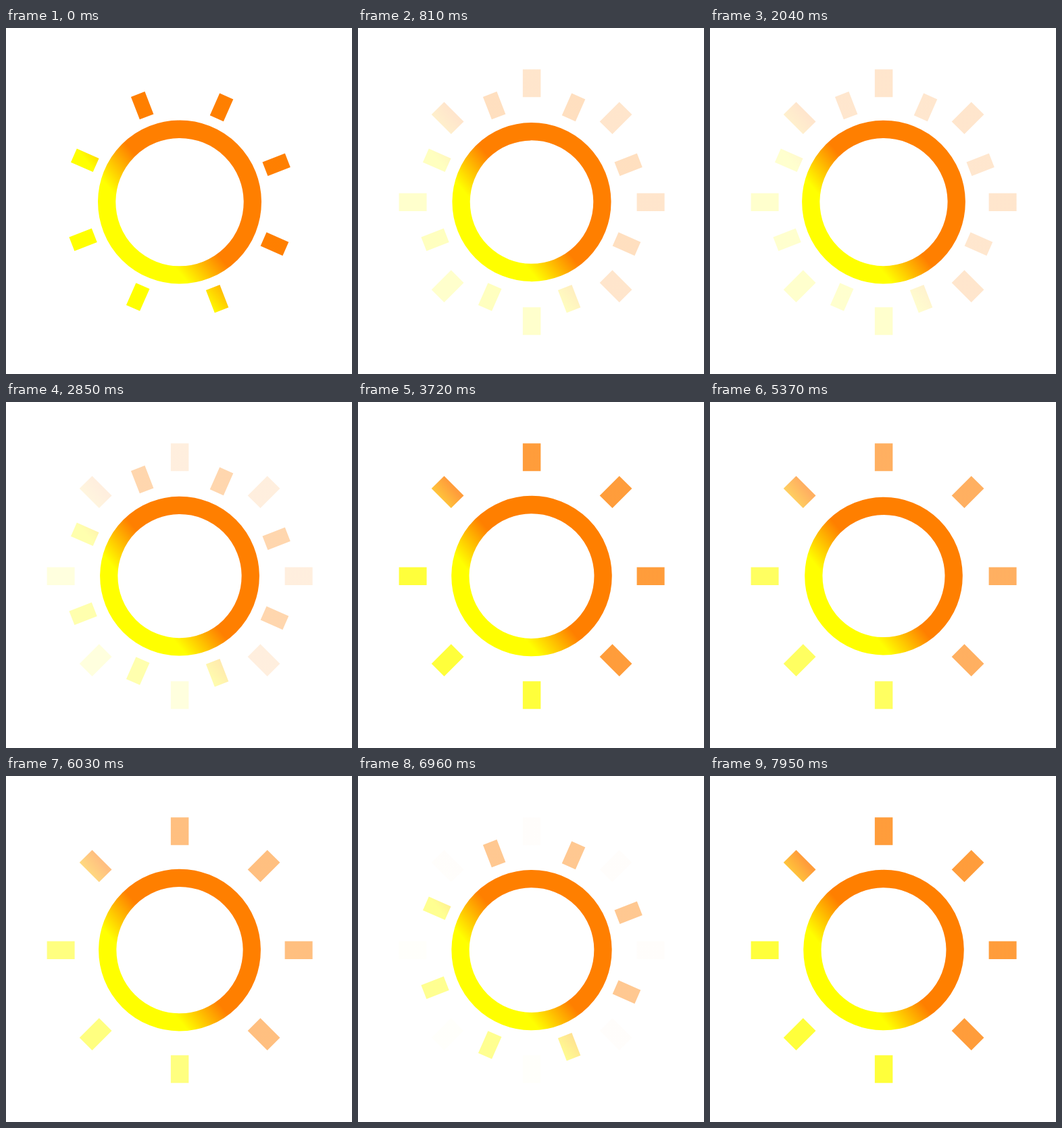
Recreate the animation shown at these times as an HTML page. Size 512x512 px, loop 8 s.

```html
<!DOCTYPE html>
<html lang="en">
<head>
<meta charset="utf-8">
<title>Sun</title>
<style>
  html, body { margin: 0; width: 100%; height: 100%; overflow: hidden; background: #fff; }
  svg { display: block; width: 100%; height: 100%; }
</style>
</head>
<body>
<svg viewBox="0 0 512 512">
  <defs>
    <linearGradient id="glow" gradientUnits="userSpaceOnUse" x1="-26.2" y1="21.8" x2="20.8" y2="-17.3">
      <stop offset="0" stop-color="#ff0"/>
      <stop offset="1" stop-color="#ff7f00"/>
    </linearGradient>
  </defs>
  <path id="near" fill="url(#glow)"/>
  <path id="far" fill="url(#glow)"/>
  <circle id="ring" cx="257" cy="257.6" r="108" fill="none" stroke="url(#glow)" stroke-width="26.3"/>
</svg>
<script>
const LOOP = 8000, PULSE = 2115;
const CENTER = { x: 257.1, y: 257.7 };
const [near, far, ring] = ['near', 'far', 'ring'].map(id => document.getElementById(id));

// [time in ms, opacity]
const NEAR_FADE = [[0, 1], [390, .64], [810, .25], [1080, 0], [1960, 0], [2040, .18], [PULSE, 1]];
const FAR_FADE = [[0, 0], [600, 0], [810, .2], [1440, 1], [1605, .77], [1800, .5], [2040, .2], [PULSE, 0]];

// Eight rectangles around the centre, as one path.
function rays(startAngle, inner, outer, width) {
  const half = width / 2;
  const corners = [[-half, -inner], [-half, -outer], [half, -outer], [half, -inner]];
  return Array.from({ length: 8 }, (_, i) => {
    const a = (startAngle + i * 45) * Math.PI / 180, c = Math.cos(a), s = Math.sin(a);
    const points = corners.map(([x, y]) =>
      `${(CENTER.x + x * c - y * s).toFixed(2)} ${(CENTER.y + x * s + y * c).toFixed(2)}`);
    return `M${points.join('L')}Z`;
  }).join('');
}

function valueAt(keys, t) {
  const i = Math.max(1, keys.findIndex(([time]) => time >= t));
  const [t0, v0] = keys[i - 1], [t1, v1] = keys[i];
  return v0 + (v1 - v0) * (t - t0) / (t1 - t0);
}

function draw(now) {
  const t = (now % LOOP) % PULSE;
  near.style.opacity = valueAt(NEAR_FADE, t);
  far.style.opacity = valueAt(FAR_FADE, t);
  ring.setAttribute('r', 105.75 + 2.1 * Math.cos(2 * Math.PI * (t / PULSE - .02)));
}

near.setAttribute('d', rays(-21.2, 135.5, 171.3, 22));
far.setAttribute('d', rays(0, 155.5, 196.5, 26.5));

const start = performance.now();
function tick() {
  draw(performance.now() - start);
  requestAnimationFrame(tick);
}
tick();
</script>
</body>
</html>
```
